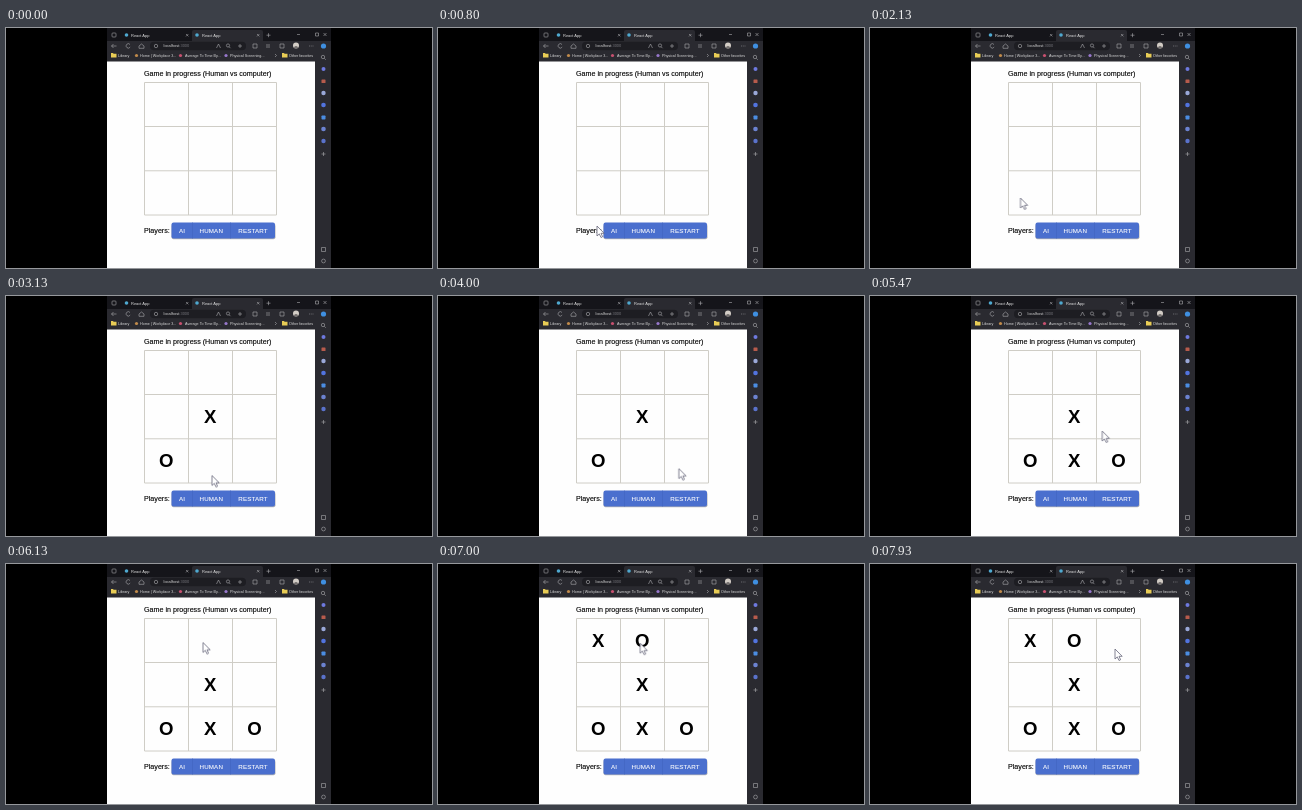
Animation, 426 px wide and 240 px high, one loop 8 s. Source, as an HTML page:

```html
<!DOCTYPE html>
<html lang="en">
<head>
<meta charset="utf-8">
<title>Tic-tac-toe</title>
<style>
  html, body { margin: 0; width: 100%; height: 100%; overflow: hidden; background: #000; }
  svg { display: block; width: 100%; height: 100%; }
  text { font-family: "Liberation Sans", Arial, sans-serif; }
  .chrome text { font-size: 3.7px; fill: #dcdcdc; }
  .chrome .tab { font-size: 4px; fill: #e4e4e4; }
  .line { fill: none; stroke: #a9a9ad; stroke-width: .6; }
  .label { font-size: 7.15px; fill: #000; stroke: #000; stroke-width: .12; }
  .button { font-size: 6.2px; letter-spacing: .15px; fill: #fff; stroke: #fff; stroke-width: .1; text-anchor: middle; }
  .board { fill: none; stroke: #cfcdc6; stroke-width: 1; }
  .mark { font-size: 18.6px; font-weight: bold; text-anchor: middle; fill: #000;
          animation: 8s step-end infinite; }

  #o1 { animation-name: o1; }
  #x1 { animation-name: x1; }
  #o2 { animation-name: o2; }
  #x2 { animation-name: x2; }
  #o3 { animation-name: o3; }
  #x3 { animation-name: x3; }
  @keyframes o1 { 0% { visibility: hidden } 29.2%, 100% { visibility: visible } }
  @keyframes x1 { 0% { visibility: hidden } 31%, 100% { visibility: visible } }
  @keyframes o2 { 0% { visibility: hidden } 58.4%, 100% { visibility: visible } }
  @keyframes x2 { 0% { visibility: hidden } 61%, 100% { visibility: visible } }
  @keyframes o3 { 0% { visibility: hidden } 82%, 100% { visibility: visible } }
  @keyframes x3 { 0% { visibility: hidden } 84.5%, 100% { visibility: visible } }

  #cursor { animation: roam 8s ease-in-out infinite; }
  @keyframes roam {
    0%, 5% { transform: translate(146px, 242px) }
    10%, 12% { transform: translate(159px, 198px) }
    22%, 31.5% { transform: translate(150.5px, 170px) }
    38%, 43% { transform: translate(206px, 179.5px) }
    54%, 63% { transform: translate(254px, 170px) }
    75.5%, 85% { transform: translate(197px, 78.5px) }
    96%, 100% { transform: translate(245px, 85px) }
  }
</style>
</head>
<body>
<svg viewBox="0 0 426 240">
  <rect width="426" height="240" fill="#000"/>

  <g class="chrome">
    <rect x="101" width="224" height="240" fill="#2a2a30"/>
    <rect x="101" width="224" height="13" fill="#15151a"/>
    <path d="M186 13V4q0-2 2-2h67q2 0 2 2v9z" fill="#2a2a30"/>
    <rect x="144" y="13.7" width="96" height="8.6" rx="4" fill="#1d1d22"/>

    <rect class="line" x="106" y="5" width="4" height="4" rx=".8"/>
    <circle cx="120.500" cy="7" r="1.800" fill="#4fa9d0"/>
    <circle cx="191" cy="7" r="1.800" fill="#4fa9d0"/>
    <text class="tab" x="125" y="8.500">React App</text>
    <text class="tab" x="196" y="8.500">React App</text>
    <path class="line" d="M180 6l2.400 2.400m0-2.400l-2.400 2.400M251 6l2.400 2.400m0-2.400l-2.400 2.400M260.500 7.200h4m-2-2v4"/>
    <path class="line" d="M291 6.500h3M309.500 5h3v3h-3zM317.500 5l3 3m0-3l-3 3"/>

    <path class="line" d="M110.500 18h-5l2-2m-2 2l2 2M124 16.500a2.200 2.200 0 1 0 .2 2.500M133 18l2.500-2 2.500 2v2.300h-5z"/>
    <circle class="line" cx="150" cy="18" r="1.700"/>
    <text x="157.500" y="19.300" style="font-size:4px">localhost<tspan fill="#77777d">:3000</tspan></text>
    <circle class="line" cx="222" cy="17.500" r="1.600"/>
    <path class="line" d="M223 18.700l1.500 1.500M210.500 20l2-4 2 4M232 18h4m-2-2v4M247 16h4v4h-4zM260 17h4m-4 2h4M274 16h4v4h-4z"/>
    <circle cx="290" cy="17.500" r="3" fill="#d3cdc6"/>
    <path d="M287.800 19.500q2.200-2.800 4.400 0a3 3 0 0 1-4.400 0z" fill="#74706f"/>
    <path class="line" d="M303 18h.8m1 0h.8m1 0h.8"/>

    <g fill="#e8cc55">
      <path d="M105 25h2l.6.700h2.900v3.800h-5.500z"/>
      <path d="M276 25h2l.6.700h2.900v3.800h-5.500z"/>
    </g>
    <text x="112" y="28.700">Library</text>
    <circle cx="130.500" cy="27.500" r="1.600" fill="#c18b4b"/>
    <text x="134" y="28.700">Home | Workplace 3...</text>
    <circle cx="174.500" cy="27.500" r="1.600" fill="#c95170"/>
    <text x="179" y="28.700">Average To Time By...</text>
    <circle cx="220" cy="27.500" r="1.600" fill="#9878cd"/>
    <text x="224" y="28.700">Physical Screening...</text>
    <path class="line" d="M269 26l1.500 1.500-1.500 1.500"/>
    <text x="283" y="28.700">Other favorites</text>

    <circle cx="317.500" cy="18" r="2.600" fill="#3f8fe0"/>
    <circle class="line" cx="317" cy="29" r="1.700"/>
    <path class="line" d="M318.300 30.300l1.500 1.500"/>
    <circle cx="317.500" cy="41" r="2" fill="#6e79df"/>
    <rect x="315.500" y="51.500" width="4" height="3.500" rx=".6" fill="#b75b4c"/>
    <circle cx="317.500" cy="65" r="2.200" fill="#9aa8d8"/>
    <circle cx="317.500" cy="77" r="2.300" fill="#5274df"/>
    <rect x="315.500" y="87.500" width="4" height="4" rx=".7" fill="#4b8de2"/>
    <circle cx="317.500" cy="101" r="2.300" fill="#6c83d1"/>
    <circle cx="317.500" cy="113" r="2.200" fill="#5a72cb"/>
    <path class="line" d="M315.500 126h4m-2-2v4M315.500 219.500h4v4h-4z"/>
    <circle class="line" cx="317.500" cy="233" r="1.900"/>
  </g>

  <rect x="101" y="33.500" width="208" height="206.500" fill="#fefefe"/>
  <text class="label" x="138" y="48.400">Game in progress (Human vs computer)</text>
  <path class="board" d="M138.500 54.500h132v132.500h-132zM182.500 54.500v132.500M226.500 54.500v132.500M138.500 98.500h132M138.500 142.800h132"/>

  <text class="label" x="138" y="204.500">Players:</text>
  <rect x="165.500" y="196" width="104" height="15.300" rx="2" fill="#999" opacity=".7"/>
  <rect x="165.500" y="194.500" width="103.500" height="16" rx="2" fill="#4a6fce"/>
  <path d="M186.500 194.500v16M224.500 194.500v16" stroke="#4266c2" stroke-width=".7"/>
  <text class="button" x="176" y="204.500">AI</text>
  <text class="button" x="205.300" y="204.500">HUMAN</text>
  <text class="button" x="247" y="204.500">RESTART</text>

  <text class="mark" id="o1" x="160.200" y="171">O</text>
  <text class="mark" id="x1" x="204.300" y="127">X</text>
  <text class="mark" id="o2" x="248.500" y="171">O</text>
  <text class="mark" id="x2" x="204.300" y="171">X</text>
  <text class="mark" id="o3" x="204.300" y="82.800">O</text>
  <text class="mark" id="x3" x="160.200" y="82.800">X</text>

  <path id="cursor" d="M0 0v10l2.300-2.100 1.700 3.600 1.600-.8-1.600-3.400h3.200z"
        fill="#fff" stroke="#66667a" stroke-width=".8" stroke-linejoin="round"/>
</svg>
</body>
</html>
```
